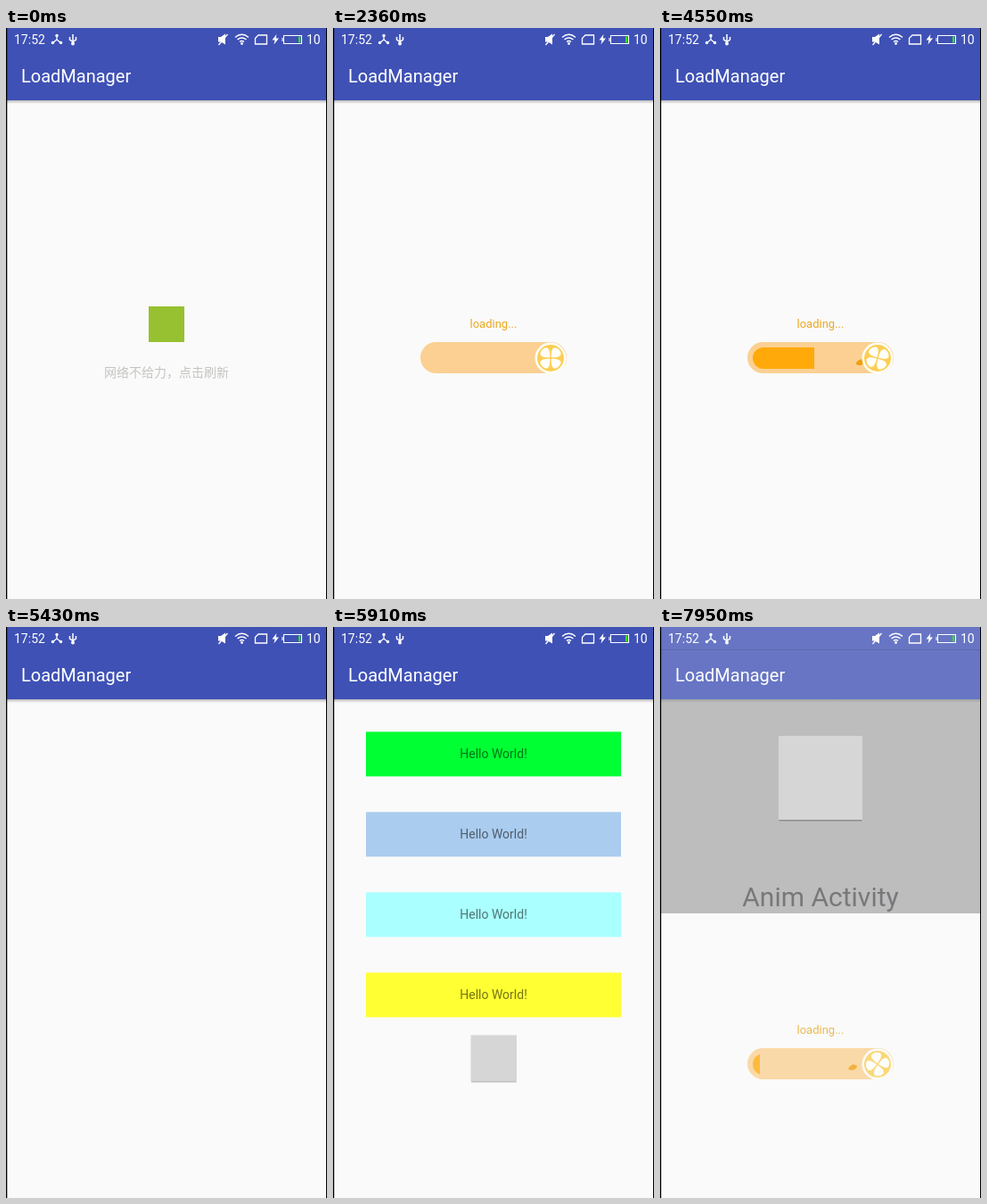
An HTML page with a canvas for the animation above (7.99 s loop, 360 by 640 pixels).

```html
<!DOCTYPE html>
<html lang="en">
<head>
<meta charset="utf-8">
<title>LoadManager</title>
<style>
  html, body { margin: 0; width: 100%; height: 100%; overflow: hidden; background: #fafafa; }
  canvas { display: block; width: 360px; height: 640px; }
</style>
</head>
<body>
<canvas id="stage"></canvas>
<script>
const LOOP = 7990, W = 360, H = 640;
const LOAD_START = 2360, LOAD_END = 5430;
const ROBOTO = 'Roboto, sans-serif';
const PAPER = '#fafafa', INDIGO = '#3f51b5';
const ROWS = ['#00ff33', '#aaccee', '#aaffff', '#ffff33'];

const dpr = window.devicePixelRatio || 1;

function sized(canvas) {
  canvas.width = W * dpr;
  canvas.height = H * dpr;
  const context = canvas.getContext('2d');
  context.scale(dpr, dpr);
  return context;
}

const stage = sized(document.getElementById('stage'));
const buffer = sized(document.createElement('canvas'));
let ctx = stage;

const clamp = v => Math.min(1, Math.max(0, v));
const span = (t, from, to) => clamp((t - from) / (to - from));
const mix = (a, b, k) => a + (b - a) * k;

function rect(color, x, y, w, h) {
  ctx.fillStyle = color;
  ctx.fillRect(x, y, w, h);
}

function disc(color, x, y, r) {
  ctx.fillStyle = color;
  ctx.beginPath();
  ctx.arc(x, y, r, 0, 7);
  ctx.fill();
}

function pill(color, x, y, w, h) {
  ctx.fillStyle = color;
  ctx.beginPath();
  ctx.roundRect(x, y, w, h, h / 2);
  ctx.fill();
}

function text(str, x, y, size, color, align = 'center', family = ROBOTO) {
  ctx.font = `${size}px ${family}`;
  ctx.textAlign = align;
  ctx.fillStyle = color;
  ctx.fillText(str, x, y);
}

function group(draw, { x = 0, y = 0, clip } = {}) {
  ctx.save();
  if (clip) {
    ctx.beginPath();
    ctx.rect(...clip);
    ctx.clip();
  }
  ctx.translate(x, y);
  draw();
  ctx.restore();
}

// Draws into a buffer first so that overlapping parts fade as one.
function layer(draw, alpha) {
  ctx = buffer;
  ctx.clearRect(0, 0, W, H);
  draw();
  ctx = stage;
  ctx.globalAlpha = alpha;
  ctx.drawImage(buffer.canvas, 0, 0, W, H);
  ctx.globalAlpha = 1;
}

function strokes(d, width) {
  ctx.lineWidth = width;
  ctx.stroke(new Path2D(d));
}

function statusIcons() {
  ctx.strokeStyle = '#fff';
  text('17:52', 9, 17.5, 14, '#fff', 'left');
  text('10', 337, 17.5, 14, '#fff', 'left');
  // network and cable
  strokes('M57 8V13L52 17M57 13L62 17', 1.3);
  [[57, 8.5], [52.5, 16.5], [61.5, 16.5]].forEach(([x, y]) => disc('#fff', x, y, 1.7));
  strokes('M75 7V18M71.5 10V13L75 15.5L78.5 13V10', 1.5);
  disc('#fff', 75, 17.5, 2);
  // muted speaker
  ctx.fillStyle = '#fff';
  ctx.fill(new Path2D('M238 10H241L246 6.5V18.5L241 15.5H238Z'));
  strokes('M238.5 19L248.5 7', 1.3);
  // wifi
  strokes('M257 10.5Q264.5 4 272 10.5M259.5 13Q264.5 8.8 269.5 13M262 15.5Q264.5 13.4 267 15.5', 1.4);
  disc('#fff', 264.5, 17.5, 1.4);
  // card, bolt, battery
  strokes('M283 8H292.5V18H279.5V11.5Z', 1.3);
  ctx.fill(new Path2D('M303.5 7L298.5 13.5H301.5L300.5 18.5L306 11.5H302.7Z'));
  strokes('M311.5 8.5H331.5V17.5H311.5ZM310 11V15', 1.1);
  rect('#35e01c', 328, 9.5, 2.2, 7);
}

const statusBar = () => rect(INDIGO, 0, 0, W, 25);

function titleBar() {
  rect(INDIGO, 0, 25, W, 56);
  const shade = ctx.createLinearGradient(0, 81, 0, 85);
  shade.addColorStop(0, 'rgba(90,90,90,.4)');
  shade.addColorStop(1, 'rgba(90,90,90,0)');
  rect(shade, 0, 81, W, 4);
  text('LoadManager', 17, 61, 20, '#fff', 'left');
}

function errorPage() {
  rect('#97c130', 160, 312, 40, 40);
  text('网络不给力，点击刷新', 180, 391, 14, '#c4c4c0', 'center',
    '"Noto Sans CJK SC", "Noto Sans CJK", sans-serif');
}

function leaf(x, y, angle) {
  ctx.save();
  ctx.translate(x, y);
  ctx.rotate(angle);
  ctx.fillStyle = '#f29f0c';
  ctx.fill(new Path2D('M-6 0Q-3 -4 2 -3L5 0Q2 4 -3 2.5Z'));
  ctx.restore();
}

function fan(degrees) {
  disc('#fffefa', 244, 370, 17.5);
  disc('#fbcf55', 244, 370, 15);
  ctx.save();
  ctx.translate(244, 370);
  ctx.rotate(degrees * Math.PI / 180);
  ctx.fillStyle = '#fffefa';
  for (let i = 0; i < 4; i++) {
    ctx.fill(new Path2D('M0 -1C-3 -4 -7 -8 -5 -11.5Q0 -15 5 -11.5C7 -8 3 -4 0 -1Z'));
    ctx.rotate(Math.PI / 2);
  }
  ctx.restore();
}

function loader(age, spin) {
  const edge = 104 + 84.7 * (1 - Math.exp(-age / 1300));
  text('loading...', 180, 336, 13, '#eaa81f');
  pill('#fbd092', 98, 352, 164, 35);
  for (let born = 0; born < age; born += 533) {
    const x = 232 - 0.118 * (age - born);
    if (x > edge + 3) leaf(x, 367.5 + 7.5 * Math.cos((232 - x) / 25), -0.4 + (232 - x) / 200);
  }
  group(() => pill('#ffa90a', 104, 358, 150, 24), { clip: [98, 352, edge - 98, 35] });
  fan(45 + 0.279 * spin);
}

function row(i) {
  const y = 117 + i * 90;
  rect(ROWS[i], 37, y, 286, 50);
  text('Hello World!', 180, y + 30, 14, 'rgba(0,0,0,.54)');
}

// The shared tile grows from the list's button into the detail page's header.
function tile(t) {
  const move = span(t, 7740, 7930);
  const k = move * move * (3 - 2 * move);
  const x = mix(154.5, 133, k), y = mix(457, 122, k), size = mix(51.5, 94, k);
  rect('rgba(80,80,80,.35)', x + 0.5, y + 1.5, size - 1, size);
  rect('#d6d6d6', x, y, size, size);
}

function detailPage(age) {
  rect(PAPER, 0, 0, W, H);
  rect('#acacac', 0, 81, W, 240);
  statusBar();
  titleBar();
  rect('rgba(30,30,90,.35)', 0, 25, W, 1);
  text('Anim Activity', 180, 313, 30, '#545458');
  if (age > 0) group(() => loader(age, age), { y: 120 });
}

function listPage(t) {
  // each part accelerates off to the left, one after another
  const exit = start => t < 7670 ? 0 : -360 * span(t, start, start + 250) ** 2;
  const remaining = (1 - span(t, 5570, 5915)) ** 1.7;
  layer(() => group(() => {
    ROWS.forEach((_, i) =>
      group(() => row(i), { x: exit(i ? 7643 + i * 25 : 7592), clip: [17, 81, 326, 559] }));
    tile(t);
  }, { y: 559 * remaining }), 1 - remaining);
  group(statusBar, { x: exit(7530.5) });
  group(titleBar, { x: exit(7545.5) });
  const fade = span(t, 7790, 7995);
  if (fade > 0) {
    layer(() => detailPage(t - 7820), fade);
    tile(t);
  }
}

// Holds still pictures and steps the rest at 25 frames per second.
function sample(t) {
  if (t < LOAD_START) return 0;
  if (t < 2560) return LOAD_START;
  if (t >= 5910 && t < 7670) return 5910;
  const offset = t < 4150 ? 0 : 30;
  return Math.floor((t - offset) / 40) * 40 + offset;
}

function draw(t) {
  rect(PAPER, 0, 0, W, H);
  if (t < LOAD_END) {
    statusBar();
    titleBar();
    if (t < LOAD_START) errorPage();
    else loader(t - LOAD_START, Math.max(0, t - 2560));
  } else {
    listPage(t);
  }
  statusIcons();
  rect('#000', 0, 0, 1.3, H);
  rect('#000', 359, 0, 1, H);
}

const begin = performance.now();
function tick() {
  draw(sample((performance.now() - begin) % LOOP));
  requestAnimationFrame(tick);
}
tick();
</script>
</body>
</html>
```
